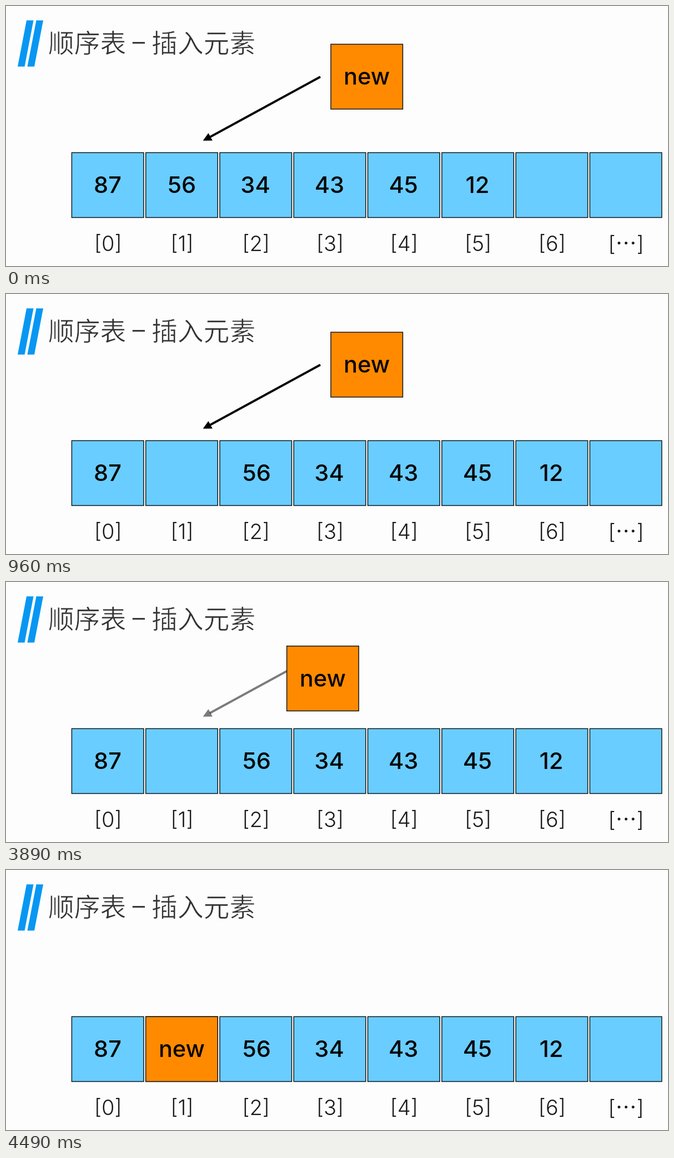
These frames come from a looping animation (1192 by 470 pixels, 5550 ms). An HTML page with a canvas:

```html
<!DOCTYPE html>
<html lang="zh-CN">
<head>
<meta charset="utf-8">
<title>顺序表</title>
<style>
  html, body { margin: 0; width: 100%; height: 100%; overflow: hidden; background: #fdfdfd; }
  canvas { display: block; }
</style>
</head>
<body>
<canvas id="stage" width="1192" height="470"></canvas>
<script>
const ctx = document.getElementById('stage').getContext('2d');

const LOOP = 5550;
const STEP = 40;
const MOVE = 450;
const FADE = 300;
// at: first visible step, lead: motion already elapsed by then
const SHIFT = { at: 80, lead: 19 };
const INSERT = { at: 3770, lead: 26 };

const PAPER = '#fdfdfd';
const CJK = '"Noto Sans CJK SC", "Noto Sans CJK", "Noto Sans", sans-serif';
const VALUE = '500 41.5px Inter, "Liberation Sans", sans-serif';
const INDEX = '300 38px Inter, ' + CJK;
const PITCH = 133.27;
const BOX = { w: 129.5, h: 117.3 };
const ROW = { x: 118.4, y: 265.1 };
const START = { x: 584.9, y: 69.1 };

const labels = ['[0]', '[1]', '[2]', '[3]', '[4]', '[5]', '[6]', '[⋯]'];
const moving = [
  { text: '56', from: 316.5, to: 451.3 },
  { text: '34', from: 449, to: 582 },
  { text: '43', from: 582.3, to: 715.6 },
  { text: '45', from: 715.6, to: 849 },
  { text: '12', from: 849, to: 982 }
];

const mix = (a, b, p) => a + (b - a) * p;
const clamp = v => Math.min(1, Math.max(0, v));
const ease = u => (1 - Math.cos(Math.PI * clamp(u))) / 2;

function elapsed(t, { at, lead }) {
  return t < at ? 0 : Math.floor((t - at) / STEP) * STEP + lead;
}

function text(str, x, y, font, color, align = 'center') {
  ctx.font = font;
  ctx.fillStyle = color;
  ctx.textAlign = align;
  ctx.fillText(str, x, y);
}

// Trims the outline with the paper colour for a lighter weight.
function thinText(str, x, y, font, color, align) {
  text(str, x, y, font, color, align);
  ctx.strokeStyle = PAPER;
  ctx.lineWidth = 0.7;
  ctx.lineJoin = 'round';
  ctx.strokeText(str, x, y);
}

function poly(points, color) {
  ctx.beginPath();
  points.forEach(([x, y]) => ctx.lineTo(x, y));
  ctx.closePath();
  ctx.fillStyle = color;
  ctx.fill();
}

function box(x, y, color) {
  ctx.fillStyle = color;
  ctx.fillRect(x, y, BOX.w, BOX.h);
  ctx.strokeStyle = '#14181c';
  ctx.lineWidth = 1.5;
  ctx.lineJoin = 'miter';
  ctx.strokeRect(x, y, BOX.w, BOX.h);
}

function heading() {
  const blue = '#0797f3';
  poly([[37, 26], [49.5, 26], [33.5, 109.5], [21, 109.5]], blue);
  poly([[54.5, 26], [67, 26], [51, 109.5], [38.5, 109.5]], blue);
  const font = '300 46.8px ' + CJK;
  thinText('顺序表', 76, 83.6, font, '#333', 'left');
  text('–', 239, 81, '300 50px ' + CJK, '#3a3a3a');
  thinText('插入元素', 262, 83.6, font, '#333', 'left');
}

function arrow(alpha) {
  if (alpha <= 0) return;
  ctx.globalAlpha = alpha;
  ctx.strokeStyle = '#000';
  ctx.lineWidth = 3.8;
  ctx.beginPath();
  ctx.moveTo(566, 128);
  ctx.lineTo(367, 237);
  ctx.stroke();
  poly([[354.6, 243.6], [364.4, 229.8], [371.8, 243.2]], '#000');
  ctx.globalAlpha = 1;
}

function draw(t) {
  const shift = ease(elapsed(t, SHIFT) / MOVE);
  const since = elapsed(t, INSERT);
  const insert = ease(since / MOVE);

  ctx.fillStyle = PAPER;
  ctx.fillRect(0, 0, 1192, 470);
  heading();

  labels.forEach((label, i) => {
    const x = ROW.x + i * PITCH;
    box(x, ROW.y, '#69cdff');
    text(label, x + BOX.w / 2 + 0.5, 442.5, INDEX, '#1c1c1c');
  });

  text('87', 183, 338.3, VALUE, '#050505');
  for (const n of moving) {
    text(n.text, mix(n.from, n.to, shift), 338.3, VALUE, '#050505');
  }

  arrow(1 - clamp(since / FADE));

  const x = mix(START.x, ROW.x + PITCH, insert);
  const y = mix(START.y, ROW.y, insert);
  box(x, y, '#ff8a00');
  text('new', x + BOX.w / 2, y + 73.3, VALUE, '#050505');
}

let origin = null;
function tick(now) {
  if (origin === null) origin = now;
  draw((now - origin) % LOOP);
  requestAnimationFrame(tick);
}
draw(0);
requestAnimationFrame(tick);
</script>
</body>
</html>
```
